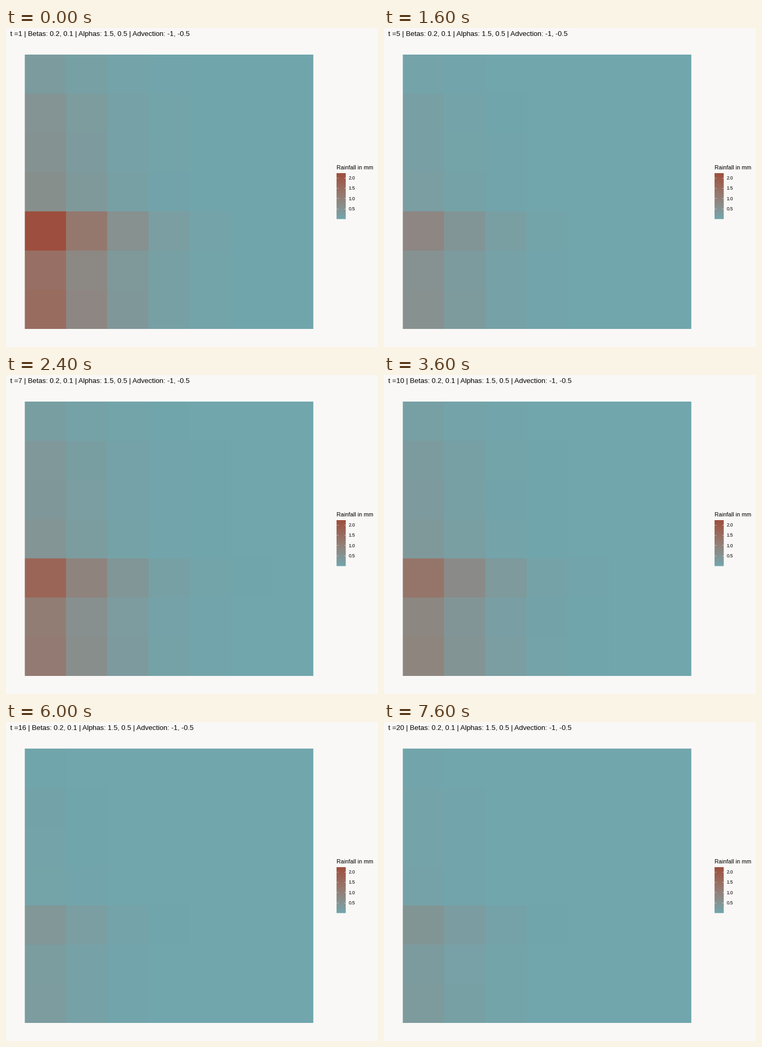
A matplotlib script that plays this animation: 700 px wide and 600 px high, repeating every 8000 ms.

```python
import numpy as np
import matplotlib.pyplot as plt
from matplotlib.animation import FuncAnimation

WIDTH, HEIGHT, DPI = 700, 600, 100
PX = 72 / DPI
LOW, HIGH, PAPER = "#71a6ad", "#9d4f3e", "#f9f8f6"
MAX_RAIN = 2.22
STEPS, CELLS = 20, 7

# Rain falls off to the right and is heaviest in the fifth row.
ROW_STRENGTH = np.array([.12, .22, .23, .27, 1, .64, .68])
COLUMN = np.arange(CELLS)
PATTERN = np.outer(ROW_STRENGTH, np.exp(-.52 * COLUMN - .09 * COLUMN ** 2))

# Bursts of rain: first step, peak, level it settles at, rate of decay.
BURSTS = [(0, 1, 0, .24), (5, 1, .57, .8), (10, .43, .19, .9), (16, .33, .19, .6)]

XYZ = np.array([[.4124, .3576, .1805], [.2126, .7152, .0722], [.0193, .1192, .9505]])
WHITE = XYZ.sum(axis=1)


def hex_rgb(color):
    return np.array([int(color[i:i + 2], 16) for i in (1, 3, 5)]) / 255


def to_lab(color):
    rgb = hex_rgb(color)
    linear = np.where(rgb > .04045, ((rgb + .055) / 1.055) ** 2.4, rgb / 12.92)
    x, y, z = np.cbrt(XYZ @ linear / WHITE)
    return np.array([116 * y - 16, 500 * (x - y), 200 * (y - z)])


def to_rgb(lab):
    y = (lab[..., 0] + 16) / 116
    xyz = np.stack([y + lab[..., 1] / 500, y, y - lab[..., 2] / 200], axis=-1) ** 3
    linear = np.clip((xyz * WHITE) @ np.linalg.inv(XYZ).T, 0, 1)
    return np.clip(np.where(linear > .0031308,
                            1.055 * linear ** (1 / 2.4) - .055, 12.92 * linear), 0, 1)


LAB_LOW, LAB_HIGH = to_lab(LOW), to_lab(HIGH)


def shade(share):
    share = np.asarray(share)[..., None]
    return to_rgb(LAB_LOW + share * (LAB_HIGH - LAB_LOW))


def rain(step):
    start, peak, floor, rate = [b for b in BURSTS if b[0] <= step][-1]
    gain = floor + (peak - floor) * np.exp(-rate * (step - start))
    return np.clip(PATTERN * gain - .02 * (1 - gain), 0, 1)


def coverage(start, end, count, first, last):
    """Share of each pixel that each of the evenly spaced cells covers."""
    edges = np.linspace(start, end, count + 1)
    pixel = np.arange(first, last)[:, None]
    return np.clip(np.minimum(pixel + 1, edges[1:]) - np.maximum(pixel, edges[:-1]), 0, 1)


class Raster:
    """Colour cells with soft edges at fractional pixel positions."""

    def __init__(self, ax, colors, left, right, top, bottom):
        x0, x1, y0, y1 = (int(v) for v in (left, np.ceil(right), top, np.ceil(bottom)))
        self.rows = coverage(top, bottom, colors.shape[0], y0, y1)
        self.columns = coverage(left, right, colors.shape[1], x0, x1)
        self.image = ax.imshow(self.blend(colors), extent=(x0, x1, y1, y0),
                               aspect="auto", interpolation="nearest")

    def blend(self, colors):
        paper = hex_rgb(PAPER)
        mixed = np.einsum("yr,rck,xc->yxk", self.rows, colors - paper, self.columns,
                          optimize=True)
        return np.clip(paper + mixed, 0, 1)

    def update(self, colors):
        self.image.set_data(self.blend(colors))


def title(step):
    return f"t ={step + 1} | Betas: 0.2, 0.1 | Alphas: 1.5, 0.5 | Advection: -1, -0.5"


plt.rcParams["font.family"] = "Liberation Sans"
fig = plt.figure(figsize=(WIDTH / DPI, HEIGHT / DPI), dpi=DPI, facecolor=PAPER)
ax = fig.add_axes([0, 0, 1, 1])
ax.axis("off")


def label(x, y, text, size):
    return ax.text(x, y, text, size=size * PX, color="black", va="baseline")


heat = Raster(ax, shade(rain(0)), 35.4, 578.3, 50, 566)
heading = label(8, 15.5, title(0), 13.2)

# Colour key
label(621.6, 266.2, "Rainfall in mm", 10.8)
Raster(ax, shade(np.linspace(1, 0, 86))[:, None], 622, 639.3, 273, 359.4)
for value in (.5, 1, 1.5, 2):
    y = 359.3 - 86.3 * value / MAX_RAIN
    for x in (622, 635.8):
        ax.plot([x, x + 3.4], [y, y], color="white", lw=PX, alpha=.5,
                solid_capstyle="butt")
    label(644.4, y + 3.2, f"{value:.1f}", 9)

ax.set_xlim(0, WIDTH)
ax.set_ylim(HEIGHT, 0)


def draw(step):
    heat.update(shade(rain(step)))
    heading.set_text(title(step))
    return heat.image, heading


animation = FuncAnimation(fig, draw, frames=STEPS, interval=400, repeat=True)
plt.show()
```
